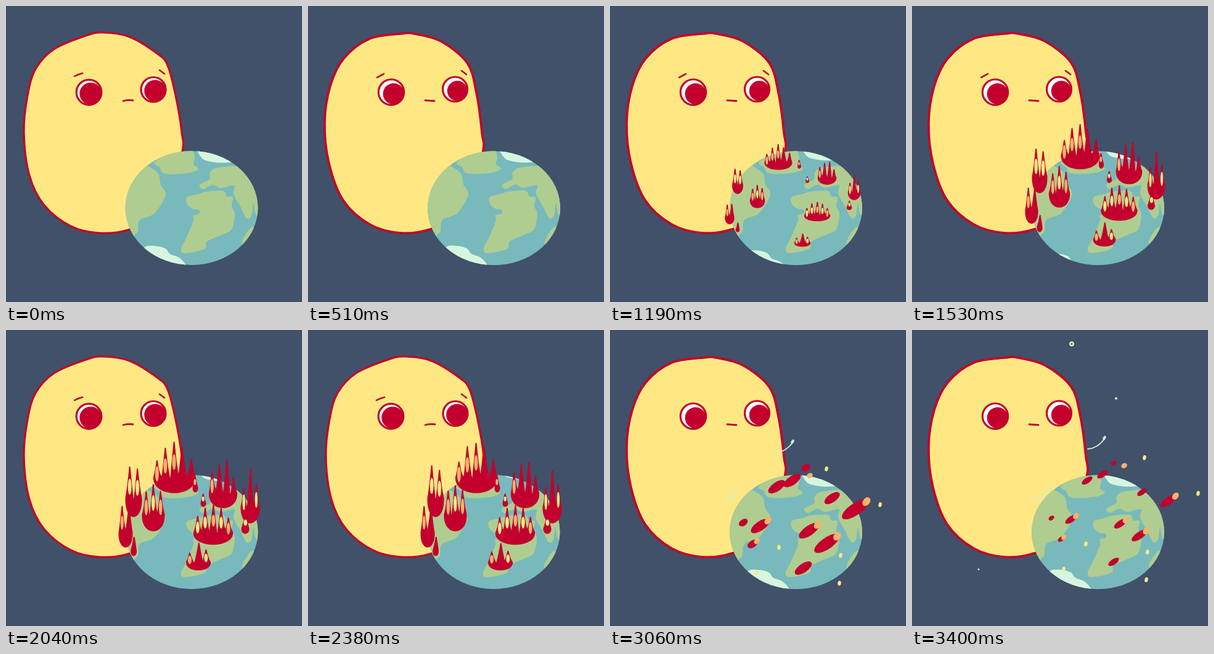
Recreate the animation shown at these times as an HTML page with a canvas. Size 480 px wide and 480 px high, loop 3.57 s.

```html
<!DOCTYPE html>
<html lang="en">
<head>
<meta charset="utf-8">
<title>Cooling the planet</title>
<style>
html, body { margin: 0; width: 100%; height: 100%; overflow: hidden; background: #415169; }
canvas { display: block; width: 100vw; height: 100vh; }
</style>
</head>
<body>
<canvas id="stage" width="480" height="480"></canvas>
<script>
const ctx = document.getElementById('stage').getContext('2d');
const STEP = 170, STEPS = 21;
const IGNITE = 5, INHALE = 15, BLOW = 16;
const NIGHT = '#415169', RED = '#c3002d', YELLOW = '#ffe884', ORANGE = '#ffb06d';
const SEA = '#78b9bc', LAND = '#afcd90', MINT = '#d6f5df', BREATH = '#c3f5d3';

const random = seed => {
  const v = Math.sin(seed * 127.1 + 3.7) * 43758.5;
  return v - Math.floor(v);
};

// Smooth closed curve through a few "x,y" points
function blob(text) {
  const p = text.split(' ').map(s => s.split(',').map(Number));
  const at = i => p[(i + p.length) % p.length];
  const path = new Path2D();
  path.moveTo(...p[0]);
  p.forEach((b, i) => {
    const a = at(i - 1), c = at(i + 1), d = at(i + 2);
    path.bezierCurveTo(b[0] + (c[0] - a[0]) / 6, b[1] + (c[1] - a[1]) / 6,
      c[0] - (d[0] - b[0]) / 6, c[1] - (d[1] - b[1]) / 6, ...c);
  });
  path.closePath();
  return path;
}

function fill(path, color) {
  ctx.fillStyle = color;
  ctx.fill(path);
}

function stroke(path, color, width) {
  ctx.strokeStyle = color;
  ctx.lineWidth = width;
  ctx.stroke(path);
}

const line = (d, color, width) => stroke(new Path2D(d), color, width);

function ellipse(x, y, rx, ry, angle = 0) {
  const path = new Path2D();
  path.ellipse(x, y, rx, ry, angle, 0, 2 * Math.PI);
  return path;
}

const oval = (x, y, rx, ry, angle, color) => fill(ellipse(x, y, rx, ry, angle), color);

// The sun: three poses, each with eyes [x, y, radius] and a pupil offset
const poses = {
  calm: {
    body: blob('157,43 200,50 245,77 262,96 275,145 285,205 285,240 255,335 198,363 150,368 105,357 62,323 38,275 29,205 35,145 48,102 78,70 130,48'),
    outline: 3.2, eyes: [[134.5, 140, 20.3], [239, 135.5, 20]], look: 3.4,
    brows: 'M111 114Q116 111 124 109M249 104L257 110', mouth: 'M190 154Q198 152 206 153'
  },
  shifted: {
    body: blob('172,45 215,57 258,92 273,140 282,205 283,240 255,335 198,362 150,368 100,354 57,315 34,255 27,190 36,130 58,85 100,53 150,45'),
    outline: 3.7, eyes: [[135, 139.7, 20.7], [238.5, 135, 20]], look: 4.6,
    brows: 'M112 116L123 110M249 105L257 111', mouth: 'M190 153L205 154'
  },
  blow: {
    body: blob('157,40 200,47 240,75 268,120 281,180 285,225 255,330 205,359 155,365 105,352 60,315 34,250 28,190 38,138 65,90 105,53'),
    outline: 3.2, eyes: [[135, 137, 22], [237, 133.5, 22.3]], look: 5.4
  }
};

function eye(x, y, r, look) {
  const ball = ellipse(x, y, r, r);
  fill(ball, '#fff');
  ctx.save();
  ctx.clip(ball);
  oval(x + look * .8, y + look * .6, r - look + 1, r - look + 1, 0, RED);
  ctx.restore();
  stroke(ball, RED, 3.2);
}

function sun(pose, brows) {
  fill(pose.body, YELLOW);
  stroke(pose.body, RED, pose.outline);
  for (const [x, y, r] of pose.eyes) eye(x, y, r, pose.look);
  if (pose.mouth) line(pose.mouth, RED, 2.8);
  else stroke(ellipse(198.5, 163, 5.5, 7.5, .55), RED, 3);
  if (brows) line(pose.brows, RED, 2.6);
}

const globe = ellipse(301, 327.5, 107.5, 92.5);
const lands = [
  '215,252 231,260 247,272 251,290 258,300 257,312 240,337 217,347 214,365 208,373 212,386 188,386 188,270',
  '242,252 285,230 301,234 306,245 304,257 312,264 295,271 258,272 249,262',
  '294,310 312,305 325,301 352,300 358,309 368,310 366,325 371,337 366,362 350,371 326,382 322,394 290,401 284,393 292,377 304,348 303,340 313,337 313,331 303,329 294,321',
  '331,270 345,262 388,262 415,290 415,340 405,338 401,320 398,340 390,344 380,325 369,305 370,291 348,295 335,290 320,297 314,290 330,281',
  '399,358 387,373 383,386 395,386 404,368'
].map(blob);
const arctic = blob('313,230 368,250 357,254 335,253 318,247');
const antarctic = blob('225,391 240,389 258,393 266,402 282,409 290,424 250,426 218,407');

function earth(jiggle, melt) {
  ctx.save();
  ctx.translate(jiggle / 2, jiggle / 4);
  fill(globe, SEA);
  ctx.clip(globe);
  ctx.translate(jiggle / 2, -jiggle / 2);
  for (const land of lands) fill(land, LAND);
  ctx.translate(0, -melt * .5);
  fill(arctic, MINT);
  ctx.translate(-melt * .4 - jiggle * 2, melt * 1.6);
  fill(antarctic, MINT);
  ctx.restore();
}

// Fires at full size: [x, base, width, height, tongues]
const fires = [
  [273, 267, 68, 82, 5], [207, 306, 27, 94, 2], [194, 355, 23, 74, 2],
  [207, 367, 10, 31, 1], [239, 329, 37, 84, 3], [307, 264, 9, 28, 1],
  [320, 287, 9, 21, 1], [352, 291, 46, 76, 4], [396, 316, 31, 85, 3],
  [388, 331, 13, 30, 1], [336, 350, 64, 62, 5], [312, 391, 40, 42, 3]
];

// A row of pointed tongues, tallest in the middle, on a round base
function fire([x, base, width, height, count], id, grow, lean, step) {
  const w = width * (.35 + .65 * grow), h = height * grow;
  const cell = w / count, low = count > 1 ? -h * .36 : -h * .3;
  const path = new Path2D(), glows = [];
  ctx.save();
  ctx.transform(1, 0, -lean, 1, x, base);
  path.moveTo(-w / 2, low);
  for (let i = 0; i < count; i++) {
    const seed = id * 9 + i, left = i * cell - w / 2;
    const u = (i + .5) / count;
    const reach = .5 + .42 * Math.sin(u * Math.PI) + .16 * (random(seed) - .5);
    const flicker = .06 * (random(seed + step * 31) - .5);
    const tip = -h * (count > 1 ? reach + .08 + flicker : 1);
    const mid = left + cell * (.42 + .16 * random(seed + 5));
    const end = i === count - 1 ? low : low * (.9 + .4 * random(seed + 7));
    path.quadraticCurveTo(mid - cell * .3, tip * .6, mid - 1, tip);
    path.quadraticCurveTo(mid, tip - 2, mid + 1, tip);
    path.quadraticCurveTo(mid + cell * .3, tip * .6, left + cell, end);
    if (random(seed + 2) > .3) glows.push([mid, tip * .62, cell, seed]);
  }
  path.bezierCurveTo(w * .55, h * .08, -w * .55, h * .08, -w / 2, low);
  fill(path, RED);
  for (const [gx, gy, size, seed] of glows) {
    const color = random(seed + 4) > .65 ? YELLOW : ORANGE;
    oval(gx, gy, Math.min(4, size * .22), Math.min(13, h * .14 + 1), 0, color);
  }
  ctx.restore();
}

// Torn-off scraps [x, y, length] and embers [x, y] at the end of their flight
const scraps = [
  [284, 244, 10], [309, 234, 10], [327, 216, 5], [373, 263, 9], [416, 277, 16],
  [226, 305, 5], [258, 307, 11], [242, 339, 6], [338, 314, 12], [369, 333, 15], [327, 376, 10]
];
const embers = [[464, 265], [377, 207], [382, 360], [380, 405], [282, 347], [246, 388]];

// They drift up and right while shrinking; left counts the steps still to fly
function debris(left) {
  const size = 1 + left * .3;
  for (const [x, y, length] of scraps) {
    const speed = 3 + length * .38, l = length * size;
    ctx.save();
    ctx.translate(x - left * speed, y + left * speed * .75);
    ctx.rotate(-.6);
    oval(0, 0, l, 2 * size + l * .25, 0, RED);
    if (length > 10 || length === 6) oval(l * .85, 0, l * .15 + 4, l * .1 + 3, -.3, ORANGE);
    ctx.restore();
  }
  oval(344 - left * 10, 220 + left * 8, 5, 4, -.6, ORANGE);
  for (const [x, y] of embers) {
    const speed = x > 370 && y < 300 ? 13 : 4;
    oval(x - left * speed, y + left * speed * .7, 2.7, 4, .2, YELLOW);
  }
}

function breath(left) {
  ctx.save();
  ctx.translate(-left * 8, left * 3);
  line('M285 193Q300 192 312 177', BREATH, 1.8);
  oval(312, 175, 2.2, 3.8, .5, BREATH);
  line('M206 274Q217 265 223 250', BREATH, 1.8);
  ctx.restore();
  oval(198, 273, 2, 2, 0, BREATH);
  oval(147, 334, 2.2, 2.2, 0, '#e2f0a0');
  if (left) return;
  oval(108, 388, 1.5, 1.5, 0, BREATH);
  oval(331, 111, 2, 2, 0, BREATH);
  stroke(ellipse(259, 22.5, 2.6, 2.8), BREATH, 2.6);
}

function puff() {
  line('M215 174L221 179L222 194M221 180L231 186L240 181', BREATH, 6.5);
  oval(239, 201, 1.2, 1.2, 0, RED);
}

function draw(step) {
  const blowing = step === INHALE || step === BLOW;
  const shifted = step % 2 === (step > BLOW ? 0 : 1);
  const pose = blowing ? poses.blow : shifted ? poses.shifted : poses.calm;
  const burning = step >= IGNITE && step <= BLOW;

  fill(ellipse(240, 240, 480, 480), NIGHT);
  sun(pose, step < INHALE);
  earth(shifted && !blowing ? 1 : 0, burning ? (step - 4) * 2.3 : 0);

  if (burning) {
    const grow = Math.min(1, .2 * (step - IGNITE + .4));
    const lean = step === BLOW ? .3 : step === INHALE ? .12 : 0;
    fires.forEach((spot, id) => fire(spot, id, grow, lean, step));
  }
  if (step === BLOW) puff();
  if (step > BLOW) {
    debris(STEPS - 1 - step);
    breath(STEPS - 1 - step);
  }
}

ctx.lineCap = ctx.lineJoin = 'round';
let shown = -1;
function tick() {
  const step = Math.floor(performance.now() / STEP) % STEPS;
  if (step !== shown) draw(shown = step);
  requestAnimationFrame(tick);
}
tick();
</script>
</body>
</html>
```
